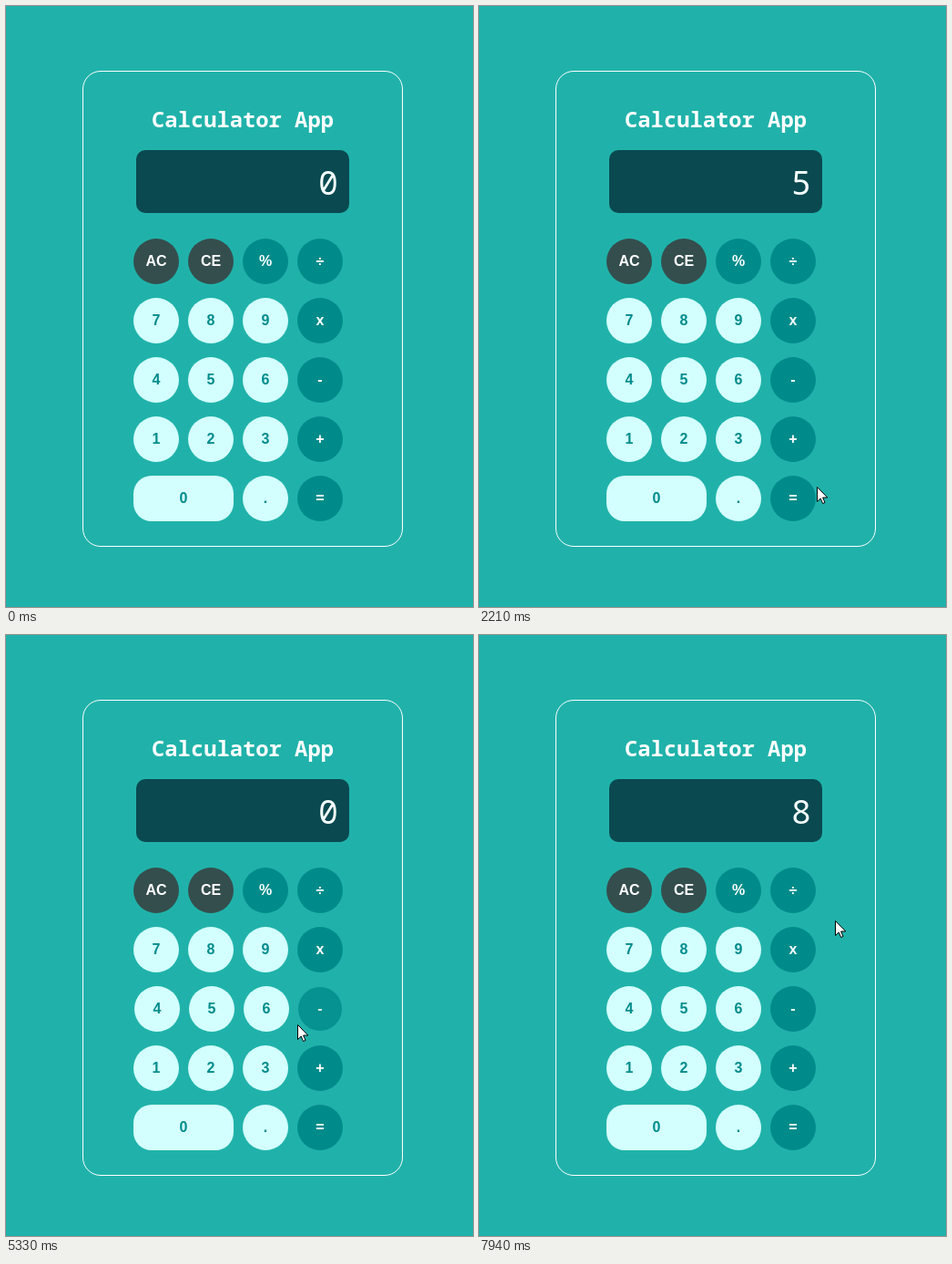
These frames come from a looping animation (513 by 659 pixels, 8 s). An HTML page with a canvas:

```html
<!DOCTYPE html>
<html lang="en">
<head>
<meta charset="utf-8">
<title>Calculator App</title>
<style>
  html, body { margin: 0; width: 100%; height: 100%; overflow: hidden; background: #20b2aa; }
  canvas { display: block; width: 513px; height: 659px; }
</style>
</head>
<body>
<canvas id="stage" width="513" height="659"></canvas>
<script>
const ctx = document.getElementById('stage').getContext('2d');
const LOOP = 8000, TICK = 10, FADE = 240, SIZE = 50;
const MONO = '"Noto Sans Mono", "DejaVu Sans Mono", monospace';
const SANS = '"Liberation Sans", Arial, sans-serif';
const DARK = '#344e4d', TEAL = '#008b8b', LIGHT = '#d3ffff';

const buttons = [];
['AC CE % ÷', '7 8 9 x', '4 5 6 -', '1 2 3 +', '0 . ='].forEach((line, row) => {
  let x = 140;
  for (const label of line.split(' ')) {
    const w = label === '0' ? 110 : SIZE;
    const fill = /[AC]/.test(label) ? DARK : /[\d.]/.test(label) ? LIGHT : TEAL;
    buttons.push({ label, row, w, fill, cx: x + w / 2, cy: 280 + row * 65 });
    x += w + 10;
  }
});

const at = (x, y) => ({ x, y });
const over = label => {
  const b = buttons.find(b => b.label === label);
  return { x: b.cx + 7, y: b.cy, label };
};

// Pointer stops: arrival, departure, place, time of the press
const stops = [
  [130, 130, at(420, 624)],
  [560, 900, over('5'), 700],
  [1080, 1150, over('+'), 1130],
  [1340, 1500, at(286, 443)],
  [1640, 1900, over('5'), 1790],
  [2210, 2270, at(371, 527)],
  [2370, 2700, over('='), 2630],
  [3130, 3590, at(301, 593)],
  [3800, 3800, at(314, 560)],
  [4300, 4300, at(316, 445)],
  [4440, 5000, over('-'), 4920],
  [5800, 6070, over('2'), 5820],
  [6300, 6400, over('='), 6400],
  [6640, 7620, at(322, 605)],
  [7740, 7740, at(375, 570)],
  [7860, 7860, at(398, 400)],
  [7935, LOOP, at(391, 313)]
];

const smooth = u => u * u * (3 - 2 * u);

function pointerAt(t) {
  const i = stops.findLastIndex(s => s[0] <= t);
  if (i < 0) return null;
  const [, leave, a] = stops[i];
  if (t <= leave) return a;
  const [arrive, , b] = stops[i + 1];
  const u = Math.pow((t - leave) / (arrive - leave), 1.5);
  return at(a.x + (b.x - a.x) * u, a.y + (b.y - a.y) * u);
}

// Run the presses made so far through the calculator
function readout(t) {
  let shown = 0, stored = 0, op = '+';
  for (const [, , place, press] of stops) {
    if (!press || press > t) continue;
    const key = place.label;
    if (/\d/.test(key)) {
      shown = shown * 10 + Number(key);
    } else if (key === '=') {
      shown = op === '+' ? stored + shown : stored - shown;
    } else {
      stored = shown;
      shown = 0;
      op = key;
    }
  }
  return String(shown);
}

function hits(b, p) {
  const dx = Math.max(0, Math.abs(p.x - b.cx) - (b.w - SIZE) / 2);
  return Math.hypot(dx, p.y - b.cy) < SIZE / 2;
}

// Hover progress of each button over the loop
for (const b of buttons) {
  let level = 0;
  b.hover = Array.from({ length: LOOP / TICK }, (_, i) => {
    const p = pointerAt(i * TICK);
    level += (p && hits(b, p) ? 1 : -1) * TICK / FADE;
    level = Math.max(0, Math.min(1, level));
    return smooth(level);
  });
}

function box(x, y, w, h, r) {
  ctx.beginPath();
  ctx.roundRect(x, y, w, h, r);
}

function write(text, x, y, font, color, align) {
  ctx.font = font;
  ctx.fillStyle = color;
  ctx.textAlign = align;
  ctx.fillText(text, x, y);
}

// A hovered button shrinks and its row closes up; edges snap to whole pixels
function drawButton(b, tick) {
  const level = b.hover[tick];
  let x = b.cx;
  for (const o of buttons) {
    if (o.row === b.row) x += Math.sign(o.cx - b.cx) * o.hover[tick];
  }
  const inset = Math.round(level);
  const w = b.w - 2 * inset, h = SIZE - 2 * inset;
  ctx.globalAlpha = 1 - 0.2 * level;
  box(Math.round(x) - w / 2, b.cy - h / 2, w, h, b.w > SIZE ? 20 : h / 2);
  ctx.fillStyle = b.fill;
  ctx.fill();
  write(b.label, x, b.cy + 5, `bold 16px ${SANS}`, b.fill === LIGHT ? TEAL : '#fff', 'center');
  ctx.globalAlpha = 1;
}

const arrow = new Path2D('M.5 .5V16.5L4.2 13L6.6 18.5L9 17.5L6.6 12H11.8Z');
const hand = new Path2D('M-1.7 14V1.2Q-1.7 -.5 0 -.5T1.7 1.2V8Q3.5 6.8 5.4 8.6' +
  'Q7.3 7.6 8.8 9.4Q11.5 9 11.5 11.8V16.5Q11.3 19 9.5 23.5H0' +
  'Q-1.5 20 -5.5 14.8Q-6.2 12.6 -4.4 12Q-3.2 11.8 -1.7 14Z' +
  'M1.7 8V12M5.4 8.6V12.5M8.8 9.4V13');

function drawPointer(p) {
  const shape = buttons.some(b => hits(b, p)) ? hand : arrow;
  ctx.save();
  ctx.translate(Math.round(p.x), Math.round(p.y));
  ctx.fillStyle = '#fff';
  ctx.strokeStyle = '#000';
  ctx.fill(shape);
  ctx.stroke(shape);
  ctx.restore();
}

function draw(t) {
  ctx.fillStyle = '#20b2aa';
  ctx.fillRect(0, 0, 513, 659);

  box(84.5, 71.5, 351, 521, 19.5);
  ctx.strokeStyle = '#fff';
  ctx.stroke();

  write('Calculator App', 260, 133, `bold 23.8px ${MONO}`, '#fff', 'center');

  box(143, 158, 234, 69, 10);
  ctx.fillStyle = '#0a4950';
  ctx.fill();
  write(readout(t), 365, 207, `500 36.6px ${MONO}`, '#f5ffff', 'right');

  const tick = Math.floor(t / TICK);
  buttons.forEach(b => drawButton(b, tick));
  const p = pointerAt(t);
  if (p) drawPointer(p);
}

const start = performance.now();
function frame() {
  draw((performance.now() - start) % LOOP);
  requestAnimationFrame(frame);
}
frame();
</script>
</body>
</html>
```
